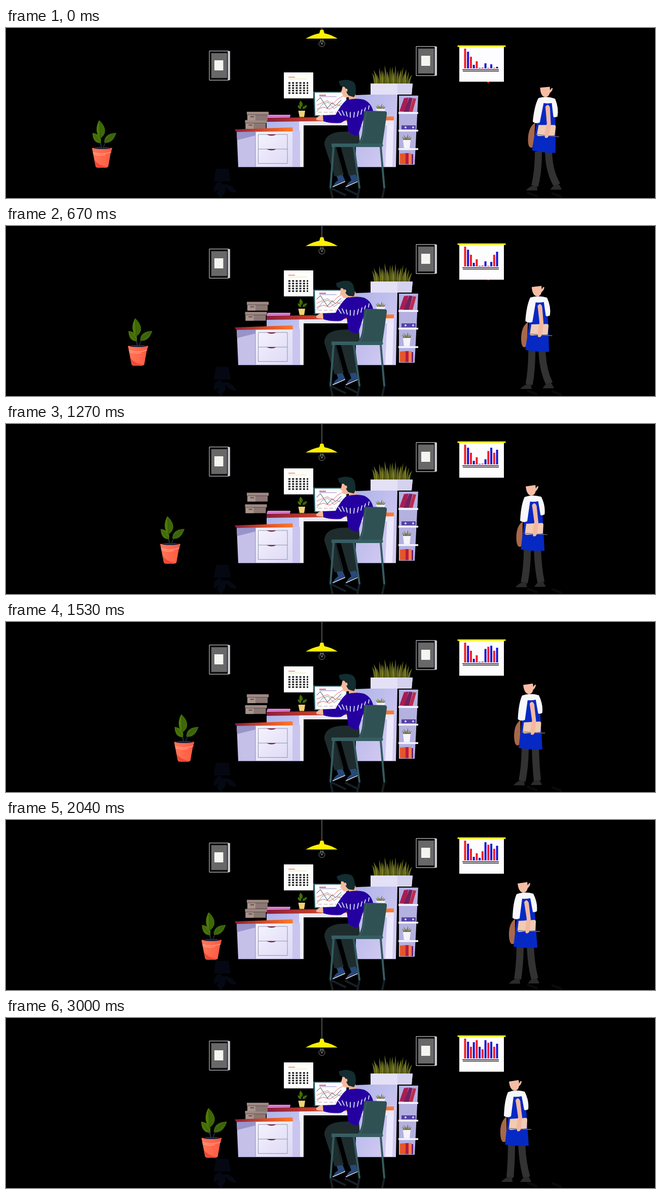
An HTML page for the animation above (3030 ms loop, 1280 px wide and 337 px high).

```html
<!DOCTYPE html>
<html lang="en">
<head>
<meta charset="utf-8">
<title>Office</title>
<style>
html, body { margin: 0; height: 100%; background: #000; overflow: hidden; }
svg { display: block; width: 100vw; height: 100vh; }
.line { fill: none; stroke-linecap: round; stroke-linejoin: round; }
</style>
</head>
<body>
<svg viewBox="0 0 1280 337">
  <defs>
    <linearGradient id="wood"><stop stop-color="#8c1d3c"/><stop offset=".5" stop-color="#d84a26"/><stop offset="1" stop-color="#ff7a2c"/></linearGradient>
    <linearGradient id="lilac" x2="1" y2="1"><stop stop-color="#aeb4ea"/><stop offset="1" stop-color="#d9cdf2"/></linearGradient>
    <linearGradient id="pale" x2="1" y2="1"><stop stop-color="#f6f4ff"/><stop offset="1" stop-color="#dcd8f4"/></linearGradient>
    <linearGradient id="clay"><stop stop-color="#ff7657"/><stop offset="1" stop-color="#ff5a41"/></linearGradient>
    <g id="picture">
      <path d="M438 45L442 46V103L438 104Z" fill="#c9c9d2"/>
      <path d="M401 45.5H438V103.500H401Z" fill="#111" stroke="#d8d8dc"/>
      <path d="M405 50H436V99H405Z" fill="#686868"/>
      <path d="M411 64H428.500V84H411Z" fill="#f4f4f0"/>
    </g>
    <g id="box">
      <path d="M2 0H45V6H2Z" fill="#9f8984"/>
      <path d="M3 6H43V17.500H3Z" fill="#8b7773"/>
      <path d="M3 6H19V17.500H3Z" fill="#a8948d"/>
      <path d="M2 6H44" stroke="#5e4f4c"/>
      <path d="M9 10H16" stroke="#5d4c49" stroke-width="2"/>
    </g>
    <g id="leaves">
      <path class="line" d="M-2 1Q-2-12-5-20M0 1Q-3-8-6-11M2 1Q4-8 8-12" stroke="#22344a" stroke-width="1.500"/>
      <path d="M-4-19C-15-31-11-46-6-55C3-47 14-31-4-19Z" fill="#4c7a08"/>
      <path d="M-4-19Q-3-38-6-55C3-47 14-31-4-19Z" fill="#3f6808"/>
      <path d="M-3-10C-13-9-19-17-19-30C-9-29 1-22-3-10Z" fill="#487309"/>
      <path d="M4-11C4-24 14-30 28-30C24-17 16-8 4-11Z" fill="#3f680c"/>
      <path class="line" d="M-4-20L-5-50M-4-11L-16-27M6-13L24-28" stroke="#274406" stroke-width=".7"/>
    </g>
  </defs>

  <use href="#picture"/>
  <use href="#picture" x="408" y="-9"/>

  <!-- calendar -->
  <path d="M548 88H606V139.500H548Z" fill="#fdfdfd"/>
  <path d="M557 97.500H570" stroke="#f07a70" stroke-width="1.500"/>
  <path d="M557 101H593" stroke="#f3e3a0"/>
  <path d="M557 109H596M557 114H596M557 119H596M557 124H596M557 129H596" stroke="#111" stroke-width="3.200" stroke-dasharray="4 3.200"/>

  <!-- chart board -->
  <circle id="knob" cx="951" r="2" fill="#e02020"/>
  <path d="M894 37H982V106.500H894Z" fill="#fdfdff"/>
  <path d="M890.500 36H985.500" stroke="#fff200" stroke-width="3"/>
  <path d="M900 82.500H972M901 85.500H972" stroke="#222" stroke-width="1.300"/>
  <g id="bars" stroke-width="4"></g>

  <!-- lamp -->
  <g id="lamp">
    <path d="M623-50V42" stroke="#9a9a9a"/>
    <circle cx="623" cy="68.500" r="6" fill="#050505" stroke="#999" stroke-width=".8"/>
    <path class="line" d="M621 60V66L623 70L625 66V60" stroke="#ccc" stroke-width=".8"/>
    <path d="M620 41H626L628 48Q640 50 654 58.500H591Q606 50 618 48Z" fill="#fff000"/>
  </g>

  <!-- cabinet and grass -->
  <path d="M690 133L772 130L769 275H690Z" fill="url(#lilac)"/>
  <path d="M752 184H765L762 275H748Z" fill="#eeeafd"/>
  <g id="grass"></g>
  <path d="M719 110L802 110L800 132H719Z" fill="#e4e1f6"/>
  <path d="M772 110H802L800 132H772Z" fill="#d5d2ef"/>

  <!-- shelf -->
  <path d="M775 134H813L806 271H775Z" fill="#b4b1e0"/>
  <path d="M776 165L785 139L794 138L787 166Z" fill="#a91c52"/>
  <path d="M785 166L795 138L802 139L795 166Z" fill="#70205f"/>
  <path d="M795 166L803 139L809 140L802 166Z" fill="#c02a4c"/>
  <path d="M780 193H808V201H780Z" fill="#5542a5"/>
  <circle cx="788" cy="197" r="2" fill="#d9d2ff"/><circle cx="803" cy="197" r="2" fill="#d9d2ff"/>
  <g id="sprout"></g>
  <path d="M783 222H798L796 238H785Z" fill="#f5f3fb"/>
  <path d="M777 249L788 248V270H777Z" fill="#e4562a"/>
  <path d="M788 248H794V270H788Z" fill="#b51d43"/>
  <path d="M794 248H800V270H794Z" fill="#ff7844"/>
  <path d="M800 250H803V270H800Z" fill="#702275"/>
  <path d="M774 168.500H813M774 203.500H813M774 240H813" stroke="#f7f5ff" stroke-width="3.500"/>

  <!-- desk -->
  <path d="M514 185H587V275H514Z" fill="url(#lilac)"/>
  <path d="M578 185H587L586 275H580Z" fill="#f2efff"/>
  <path d="M587 183H765V193H587Z" fill="#e9e6fa"/>
  <path d="M514 178L765 175.500V183L514 186Z" fill="url(#wood)"/>
  <path d="M516 172H561L560 177.500L514 178Z" fill="#e68ad8"/>
  <path d="M516 175H561" stroke="#b355b4"/>
  <g id="rosette"></g>
  <path d="M730 160H748L746 166H732Z" fill="#eceafa"/>

  <!-- desk plant -->
  <use href="#leaves" transform="translate(583 164) scale(.4 .36)"/>
  <path d="M576.500 164H590L588 176.500H579Z" fill="#f4d272"/>

  <!-- drawers and boxes -->
  <use id="low" href="#box" x="469.500"/>
  <use id="top" href="#box" x="473"/>
  <path d="M455 205H492V275H458Z" fill="#c4c0e8"/>
  <path d="M455 206H492V213L456 222Z" fill="#9893c9"/>
  <path d="M492 205H565V275H492Z" fill="url(#pale)"/>
  <path d="M565 204H580V275H565Z" fill="#cac5ee"/>
  <path d="M451 201L565 197L566 205L454 206Z" fill="url(#wood)"/>
  <path d="M497.500 211H555V268.500H497.500ZM497.500 240H555M492 206V275" fill="none" stroke="#8886a0" stroke-width=".9"/>
  <path d="M514 211H533Q524 216 514 211ZM514 240H533Q524 245 514 240Z" fill="#841c3a"/>
  <path d="M458 275.500H587M690 275.500H769" stroke="#8a84ac"/>

  <!-- monitor -->
  <path d="M606 126H672V175H608Z" fill="#2c5960"/>
  <path d="M609 128H671V173H610Z" fill="#fcfcff"/>
  <path d="M618 133.500H631" stroke="#e7504c" stroke-width="2"/>
  <path d="M618 136H652" stroke="#9486c5"/>
  <g class="line">
    <path d="M613 145L620 138L634 159L643 148L650 154L661 143" stroke="#344454"/>
    <path d="M613 153L624 148L634 144L644 151L654 141L668 133" stroke="#ed6b6b"/>
    <path d="M613 161L626 157L638 161L652 152L668 156" stroke="#e85d70"/>
    <path d="M613 166L624 151L635 147L647 160L663 148" stroke="#7f9c94"/>
  </g>
  <path d="M616 167H654" stroke="#b5a59d" stroke-dasharray="7 4"/>

  <!-- reflections -->
  <path d="M414 279H439L443 304H410Z" fill="#050812"/>
  <path d="M424 304Q408 309 410 325Q424 321 426 309Q436 310 432 326L424 337L415 328L425 314ZM430 310Q445 308 455 326Q440 328 430 310Z" fill="#050914"/>
  <path class="line" d="M640 318L644 337M644 319L669 331M697 318L693 337M670 319L694 331M746 318L742 337" stroke="#162027" stroke-width="4"/>
  <path class="line" d="M1030 327L1046 333M1078 328L1094 334" stroke="#0a0a0c" stroke-width="5"/>

  <!-- man -->
  <path d="M651 291L663 289L669 303L645 314Q648 306 655 302Z" fill="#274878"/>
  <path d="M677 291L690 289L694 302L671 314Q674 306 681 302Z" fill="#274878"/>
  <path d="M644 315L669 304M670 315L694 304" stroke="#d9dcec" stroke-width="1.500"/>
  <path d="M696 204L657 206Q627 210 628 232L648 294L666 291L651 235H660L676 293L692 290L685 235L698 232Z" fill="#1e2c2e"/>
  <path class="line" d="M650 235L662 287" stroke="#0f191c"/>
  <path d="M627 172Q618 172 612 179Q611 183 616 183L628 184Z" fill="#f5b99d"/>
  <path d="M675 131L689 130L692 142L677 146Z" fill="#eeae93"/>
  <path d="M671 143Q690 138 706 142Q722 149 725 169L709 168L694 214Q682 212 675 205L672 181L661 188Q642 190 626 185L625 173L650 172Q660 153 671 143Z" fill="#2500a0"/>
  <path class="line" d="M671 181L676 165" stroke="#160072"/>
  <path class="line" d="M656 165L661 173M663 164L667 173M671 166L673 175M679 167V177M687 167L686 177M695 165L693 175M702 162L700 171M709 158L707 165M716 154L715 161" stroke="#ece8ff" stroke-width="1.700"/>
  <g id="head">
    <path d="M664 115L662 124L660 128L663 130L665 136Q671 139 679 136L686 129L684 113Z" fill="#f5b99d"/>
    <path d="M657 108Q655 104 662 104Q671 101 682 105Q690 108 690 121Q691 131 686 137L676 134Q671 129 670 121L668 117Q657 116 657 108Z" fill="#132d30"/>
    <path d="M670 120Q675 120 673 126L670 126Z" fill="#f5b99d"/>
  </g>

  <!-- chair -->
  <path class="line" d="M646 235L640 316M686 235L697 316M739 235L746 316" stroke="#345c61" stroke-width="4"/>
  <path d="M709 164L747 165Q752 165 751 171L742 233L692 232Q701 222 703 204L706 169Q706 164 709 164Z" fill="#2f5154"/>
  <path class="line" d="M711 167Q707 181 706 203Q704 223 697 230" stroke="#426a6c"/>
  <path d="M642 229H742Q746 234 741 236H642Z" fill="#365e62"/>

  <!-- moving plant -->
  <g id="plant">
    <use id="growth" href="#leaves"/>
    <path d="M-20 0Q0-4 20 0L17 9L12 37Q10 39 6 39H-8Q-12 39-13 36Z" fill="url(#clay)"/>
    <ellipse cy="0" rx="17" ry="2" fill="#1f2238"/>
    <path class="line" d="M-18 9Q0 14 18 8M-17 12Q-3 16 6 13" stroke="#ffb6a4"/>
    <path d="M-15 24Q-6 35 9 37Q1 40-9 39Q-13 38-15 24Z" fill="#ef4737"/>
  </g>

  <!-- walker -->
  <g id="legs" class="line" stroke="#323232" stroke-width="14" style="stroke-linecap:butt"><path/><path/></g>
  <g id="feet" fill="#2b2b2b">
    <path d="M-3-9L5-9L6 1H-16Q-14-3-3-9Z"/>
    <path d="M-3-9L5-9L10 0L8 1H-12Q-11-3-3-9Z"/>
  </g>
  <g id="torso">
    <path d="M987 196Q974 205 975 230Q976 246 982 246Q990 245 987 225Z" fill="#a8684a"/>
    <path d="M1000 154L1020 153Q1026 174 1027 195L1031 253Q1008 255 984 251L990 196Z" fill="#0629c4"/>
    <path d="M990 147Q1005 141 1023 146Q1032 164 1030 181Q1025 184 1022 182L1017 155Q1008 157 1001 156L996 195Q988 199 982 194Q983 163 990 147Z" fill="#f8f8fb"/>
    <path d="M992 126L1011 123L1012 130Q1015 123 1017 126Q1016 132 1012 135Q1010 144 1003 144Q994 143 992 126Z" fill="#f6bda4"/>
    <path d="M994 200L1025 198Q1028 198 1028 202L1027 219L995 222Q992 222 992 218Z" fill="#f1cbb2"/>
    <path d="M990 219L1036 221" stroke="#72727c" stroke-width="1.300"/>
    <path d="M1005 163Q1010 155 1014 164L1018 197L1016 218Q1014 227 1008 224L1007 216L1010 196Z" fill="#f3b8a0"/>
  </g>
</svg>
<script>
const $ = id => document.getElementById(id);
const LOOP = 3030, STEP = 330;
const clamp = v => Math.max(0, Math.min(1, v));
const mix = (a, b, k) => a + (b - a) * k;

function add(parent, tag, attrs) {
  const el = document.createElementNS('http://www.w3.org/2000/svg', tag);
  for (const k in attrs) el.setAttribute(k, attrs[k]);
  return parent.appendChild(el);
}

// Pointed blades fanning out from a base line.
function blades(id, x, y, width, count, height, lean) {
  const w = width / count * .65;
  for (let i = 0; i < count; i++) {
    const k = i / (count - 1) - .5, bx = x + k * width * .86;
    const h = height * (.82 + .18 * Math.sin(i * 2.4)) * (1 - 1.2 * k * k);
    const tip = bx + k * lean + w * .6 * Math.sin(i * 5), mid = y - h * .45;
    add($(id), 'path', {
      d: `M${bx - w * .6} ${y}Q${bx - w} ${mid} ${tip} ${y - h}Q${bx + w} ${mid} ${bx + w * .6} ${y}Z`,
      fill: ['#686b1c', '#7a7d28', '#555a14'][i % 3]
    });
  }
}
blades('grass', 761, 111, 78, 19, 39, 10);
blades('sprout', 790.5, 223, 13, 6, 14, 8);
blades('rosette', 739, 161, 13, 6, 12, 9);

const tops = [41, 47, 57, 48, 44, 57, 62, 44, 49, 47, 57, 51];
const lows = [41, 47, 57, 73, 66, 79, 78.5, 70, 79, 72, 79, 77];
const bars = tops.map((_, i) => add($('bars'), 'path', { stroke: i % 2 ? '#1a12d8' : '#f01e24' }));

// Walker poses
const times = [0, 330, 1030, 1530, 2040, 2540, 3000];
const pose = {
  x: [53, 45, 35, 27, 17, 5, 0],
  y: [-7, -6, -3, -1, 0, 0, 0],
  tilt: [3.8, 3, 1.2, .5, 0, 0, 0],
  left: [1042, 1036, 1025, 1017, 1008, 997, 993],
  right: [1086, 1080, 1061, 1047, 1042, 1030, 1026],
  lift: [5, 4, 3, 2, 1, 0, 0]
};
function at(name, t) {
  const v = pose[name];
  let i = 0;
  while (i < 5 && t > times[i + 1]) i++;
  return mix(v[i], v[i + 1], clamp((t - times[i]) / (times[i + 1] - times[i])));
}

const move = (el, value) => el.setAttribute('transform', value);

function walk(t) {
  const x = at('x', t), lift = at('lift', t);
  move($('torso'), `translate(${x} ${at('y', t)}) rotate(${at('tilt', t)} 1008 252)`);
  ['left', 'right'].forEach((side, i) => {
    const fx = at(side, t), fy = 324 - lift * (i ? .9 : .6), hip = 997 + x + i * 20;
    $('legs').children[i].setAttribute('d', `M${hip} 245Q${hip + i} 285 ${fx + 1} ${fy - 8}`);
    move($('feet').children[i], `translate(${fx} ${fy})`);
  });
}

function draw(now) {
  const t = now % LOOP;
  move($('plant'), `translate(${mix(189.5, 405.5, clamp(t / 2040))} 238)`);
  move($('growth'), `scale(${mix(1, 1.08, clamp((t - 2040) / 960))})`);
  move($('lamp'), `translate(0 ${mix(-37.5, 0, clamp(t / 1340))})`);

  const rise = t < 1280 ? t / 1280 : clamp((2380 - t) / 1100);
  $('top').setAttribute('y', mix(t < 1280 ? 166 : 168, 136, rise));
  $('low').setAttribute('y', mix(t < 1280 ? 182.5 : 184, 159, rise));

  const nod = (1 - Math.cos(t / 1550 * 2 * Math.PI)) / 2;
  move($('head'), `translate(0 ${2.5 * nod}) rotate(${-12 * nod} 686 138)`);
  $('knob').setAttribute('cy', mix(107.5, 104, clamp(t / 1400)));

  bars.forEach((bar, i) => {
    const k = clamp(t / STEP - (11 - i));
    bar.setAttribute('d', `M${905.5 + i * 5.73} 80V${mix(lows[i], tops[i], k)}`);
  });
  walk(t);
}

const start = performance.now();
function tick() {
  draw(performance.now() - start);
  requestAnimationFrame(tick);
}
tick();
</script>
</body>
</html>
```
